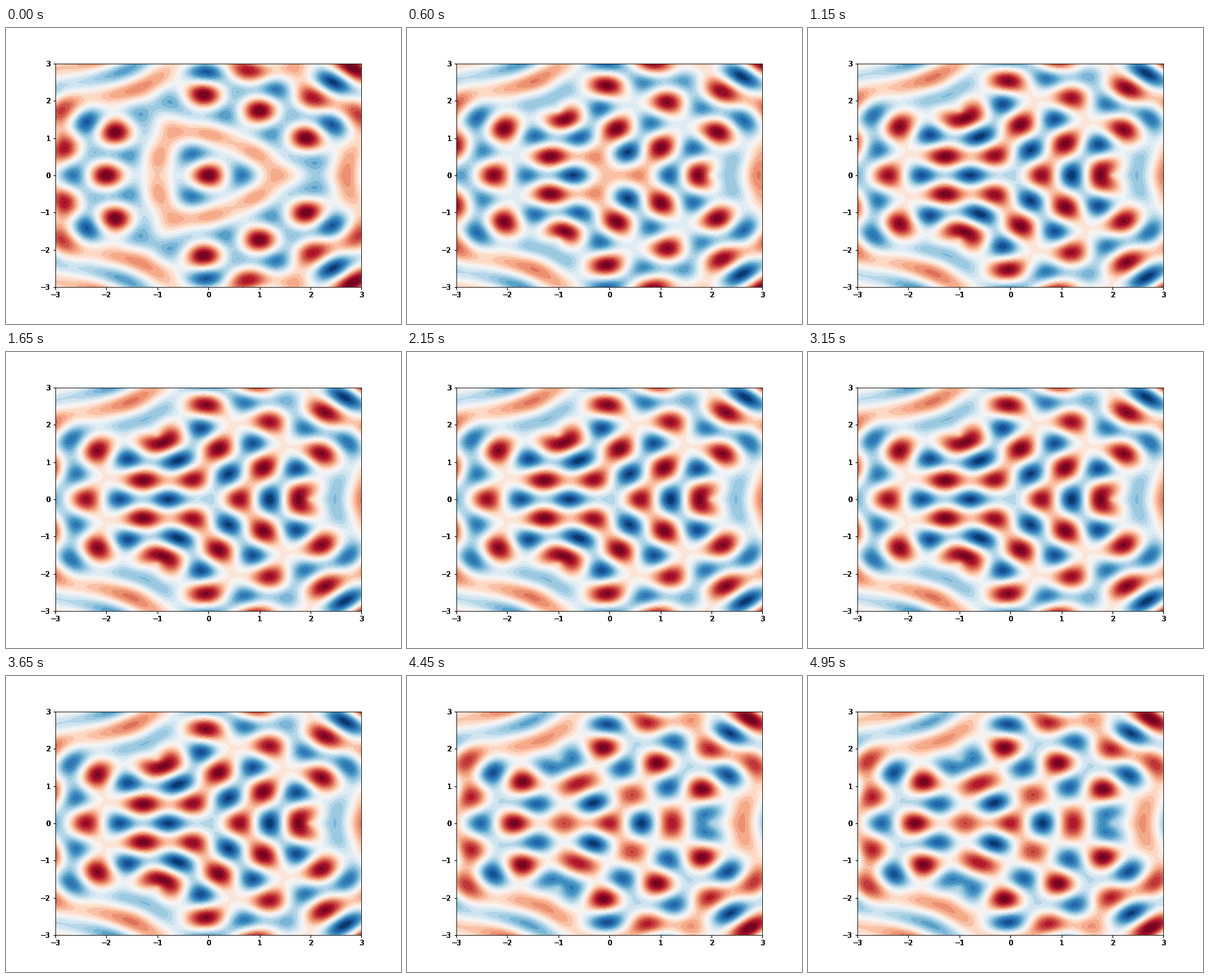
Write a matplotlib script that moves like this. It is 576 px wide and 432 px high and loops after 5 s.

```python
import numpy as np
import matplotlib.pyplot as plt
from matplotlib.animation import FuncAnimation

plt.rcParams.update({"font.family": "DejaVu Sans", "font.size": 10})

FRAMES = 100
PERIOD = 10          # frames per wave cycle
WAVELENGTH = 1.0
RADIUS = 2.0         # distance of each source from the centre
EXTENT = 3
LABEL_LAYERS = 8     # stacked copies give the labels their heavy edges

axis = np.linspace(-EXTENT, EXTENT, 200)
X, Y = np.meshgrid(axis, axis)

# Three sources on the corners of an equilateral triangle
angles = 2 * np.pi * np.arange(3) / 3
distances = [np.hypot(X - RADIUS * np.cos(a), Y - RADIUS * np.sin(a))
             for a in angles]

fig = plt.figure(figsize=(8, 6), dpi=72, facecolor="white")
fig.subplots_adjust(left=0.125, right=0.9, bottom=0.125, top=0.88)
ax = fig.add_subplot()


def draw_labels(ticks, pad=7):
    x_trans, x_va, x_ha = ax.get_xaxis_text1_transform(pad)
    y_trans, y_va, y_ha = ax.get_yaxis_text1_transform(pad)
    for v in ticks:
        label = str(v).replace("-", "\u2212")
        for _ in range(LABEL_LAYERS):
            ax.text(v, 0, label, transform=x_trans, va=x_va, ha=x_ha)
            ax.text(0, v, label, transform=y_trans, va=y_va, ha=y_ha)


def setup_axes():
    ticks = range(-EXTENT, EXTENT + 1)
    ax.set(xlim=(-EXTENT, EXTENT), ylim=(-EXTENT, EXTENT),
           xticks=ticks, yticks=ticks)
    ax.tick_params(width=1, labelbottom=False, labelleft=False)
    draw_labels(ticks)


def wave_sum(cycle):
    return sum(np.cos(2 * np.pi * (r / WAVELENGTH - cycle)) for r in distances)


def animate(i):
    for old in list(ax.collections):
        old.remove()
    z = wave_sum((i % PERIOD) / PERIOD)
    return [ax.contourf(X, Y, z, 25, cmap="RdBu_r")]


setup_axes()
anim = FuncAnimation(fig, animate, frames=FRAMES, interval=50,
                     repeat=True, repeat_delay=0)
plt.show()
```
